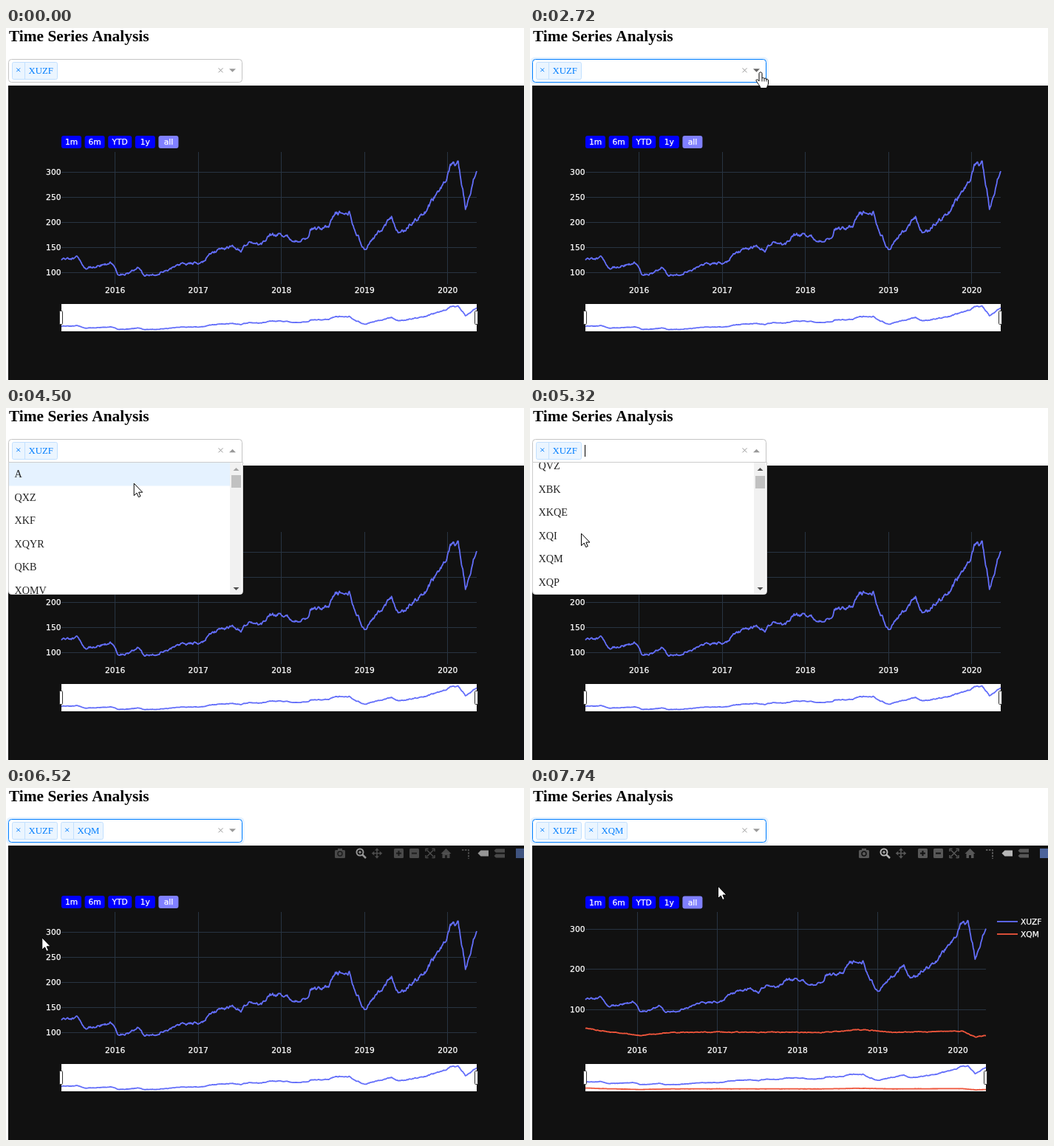
Animation of 701 by 477 pixels, one loop 8 s. Source, as an HTML page with a canvas:

```html
<!DOCTYPE html>
<html lang="en">
<head>
<meta charset="utf-8">
<title>Time Series Analysis</title>
<style>
html, body { margin: 0; width: 100%; height: 100%; overflow: hidden; background: #fff; }
canvas { display: block; width: 701px; height: 477px; }
</style>
</head>
<body>
<canvas id="stage" width="701" height="477"></canvas>
<script>
const ctx = document.getElementById('stage').getContext('2d');
const LOOP = 8000;
const SERIF = '"Liberation Serif", serif';
const SANS = '10.7px "DejaVu Sans", sans-serif';
const BLUE = '#636efa', RED = '#ef553b', ACCENT = '#007eff';
const OPTIONS = ['A', 'QXZ', 'XKF', 'XQYR', 'QKB', 'XQMV', 'QVZ', 'XBK', 'XKQE', 'XQI', 'XQM', 'XQP'];
const FIRST = 'XUZF', SECOND = 'XQM';
const ROW = 31.5, BLINK = 547;

// Moments of the interaction, in ms
const ENTER = 730, HOVER = 1360, FOCUS = 1760, OPEN = 2870, LEAVE = 4200;
const WHEEL = 5000, WHEEL_END = 5400, PICK = 6520, UPDATE = 7490;

// time, x, y of the pointer's turning points
const PATH = [
  [ENTER, 560, 300], [HOVER, 309, 62], [1610, 300, 58], [2320, 300, 58], [2720, 312, 60],
  [LEAVE, 312, 60], [4500, 173.5, 102], [4740, 104, 147], [5320, 69.5, 170], [5720, 54, 181],
  [6140, 48.5, 203], [PICK, 48.5, 203], [6950, 165, 106], [7100, 209, 74], [7610, 254.5, 133]
];

// position along the axis, price at the main turns
const HIGH = [
  [0, 125], [22, 130], [33, 109], [69, 118], [76, 96], [92, 97], [104, 110], [112, 94], [127, 95],
  [160, 116], [192, 120], [200, 136], [230, 152], [243, 145], [255, 159], [271, 154], [280, 174],
  [304, 176], [311, 163], [333, 167], [337, 185], [361, 191], [370, 220], [390, 221], [396, 188],
  [410, 146], [447, 208], [457, 176], [492, 220], [519, 282], [527, 315], [537, 324], [547, 228],
  [555, 272], [562, 308]
];
const LOW = [[0, 53], [35, 43], [75, 35], [120, 43], [330, 43], [370, 50], [420, 42], [510, 46], [528, 31], [542, 35]];

const ARROW = new Path2D('M0 0V16.5L3.8 13L6.2 18.5L8.8 17.4L6.4 12H11.5Z');
const HAND = new Path2D('M-2 1.5C-2-.6 2-.6 2 1.5V8.5C2 7 5 7 5 8.8C5.4 7.6 8 7.9 8 9.8C8.5 8.8 10.5 9.3 10.5 11V15C10.5 18 8.5 18.5 8.5 21.5H0C-.2 19-2.5 17-4 14.5C-5.5 12-6.8 11-5.5 10C-4.5 9.3-3 10.5-2 12Z');

const clamp = v => Math.max(0, Math.min(1, v));

// Linear walk through keys of the form [position, ...values]
function along(keys, pos) {
  const next = Math.max(1, keys.findIndex(k => k[0] > pos));
  const i = pos >= keys.at(-1)[0] ? keys.length - 1 : next;
  const [a, b] = [keys[i - 1], keys[i]];
  const u = clamp((pos - a[0]) / (b[0] - a[0]));
  return a.slice(1).map((v, n) => v + (b[n + 1] - v) * u);
}

// Turns key prices into [fraction, price] pairs with a seeded daily walk
function makeSeries(keys, seed) {
  const width = keys.at(-1)[0], days = 1258, points = [];
  let drift = 0;
  for (let i = 0; i <= days; i += 2) {
    seed = (seed * 16807) % 2147483647;
    drift = drift * 0.7 + (seed / 2147483647 - 0.5) * 0.033;
    const u = i / days;
    points.push([u, along(keys, u * width)[0] * (1 + drift)]);
  }
  return points;
}
const highSeries = makeSeries(HIGH, 421733);
const lowSeries = makeSeries(LOW, 977121);

// base is the stage height of price 100
const WIDE = { width: 562, base: 331, unit: 0.68, step: 50, shift: 0 };
const NARROW = { width: 542, base: 300, unit: 0.5425, step: 100, shift: 0.5 };

function text(str, x, y, font, color, align = 'left') {
  ctx.font = font;
  ctx.fillStyle = color;
  ctx.textAlign = align;
  ctx.fillText(str, x, y);
}

// Chart text, slightly emboldened
function label(str, x, y, align) {
  text(str, x, y, SANS, '#fff', align);
  ctx.lineWidth = 0.25;
  ctx.strokeStyle = '#fff';
  ctx.strokeText(str, x, y);
}

function rect(x, y, w, h, color) {
  ctx.fillStyle = color;
  ctx.fillRect(x, y, w, h);
}

function box(x, y, w, h, r, fill, stroke) {
  ctx.beginPath();
  ctx.roundRect(x, y, w, h, r);
  if (fill) { ctx.fillStyle = fill; ctx.fill(); }
  if (stroke) { ctx.lineWidth = 1; ctx.strokeStyle = stroke; ctx.stroke(); }
}

function poly(points, color) {
  ctx.beginPath();
  points.forEach(([x, y]) => ctx.lineTo(x, y));
  ctx.fillStyle = color;
  ctx.fill();
}

function line(points, color, width) {
  ctx.beginPath();
  points.forEach(([x, y]) => ctx.lineTo(x, y));
  ctx.strokeStyle = color;
  ctx.lineWidth = width;
  ctx.lineJoin = 'round';
  ctx.stroke();
}

function ring(x, y, r, color, width) {
  ctx.beginPath();
  ctx.arc(x, y, r, 0, 7);
  ctx.lineWidth = width;
  ctx.strokeStyle = color;
  ctx.stroke();
}

function triangle(x, y, dir, color, half = 4.5, height = 4.5) {
  poly([[x - half, y - dir * height / 2], [x + half, y - dir * height / 2], [x, y + dir * height / 2]], color);
}

function cross(x, y, r, color) {
  line([[x - r, y - r], [x + r, y + r]], color, 1);
  line([[x - r, y + r], [x + r, y - r]], color, 1);
}

function drawButtons(y) {
  let x = 75;
  ['1m', '6m', 'YTD', '1y', 'all'].forEach(name => {
    const w = name === 'YTD' ? 32 : 27;
    box(x, y, w, 17, 3, name === 'all' ? '#8080ff' : '#00f');
    label(name, x + w / 2, y + 12, 'center');
    x += w + 4.6;
  });
}

function drawChart(view, series) {
  const yOf = price => view.base - (price - 100) * view.unit;
  rect(3, 78, 698, 399, '#111');
  drawButtons(146 + view.shift);

  for (let year = 0; year < 5; year++) {
    const x = 75 + view.width * (235.8 + 365.25 * year) / 1824;
    rect(Math.floor(x), 168, 1, 179, '#283442');
    label(2016 + year, x, 359, 'center');
  }
  for (let price = 100; price <= 300; price += view.step) {
    const y = Math.floor(yOf(price));
    rect(75, y, view.width, 1, '#283442');
    label(price, 74.5, y + 4, 'right');
  }

  rect(75, 374, view.width, 37, '#fff');
  series.forEach(([points, color]) => {
    const main = points.map(([u, price]) => [75 + u * view.width, yOf(price)]);
    line(main, color, 1.8);
    line(main.map(([x, y]) => [x, 374 + (y - 168) * 37 / 179]), color, 1.8);
  });
  [75, 75 + view.width].forEach(x => box(x - 2.5, 383.5, 4, 18, 1, '#fff', '#333'));
}

function drawLegend() {
  [[FIRST, BLUE, 181], [SECOND, RED, 198]].forEach(([name, color, y]) => {
    line([[632, y], [660, y]], color, 1.8);
    label(name, 664, y + 4, 'left');
  });
}

function drawModebar(alpha) {
  const dim = '#585858', lit = '#b7b7b7', back = '#111';
  ctx.save();
  ctx.globalAlpha = alpha;

  // camera
  box(445, 84, 14, 11, 1.5, dim);
  rect(449, 82, 6, 3, dim);
  ring(452, 89, 3, back, 1.5);

  // magnifier
  ring(479, 87, 4.5, lit, 2);
  line([[482.5, 90.5], [487, 95]], lit, 2.5);
  line([[477, 87], [481, 87]], lit, 1.2);
  line([[479, 85], [479, 89]], lit, 1.2);

  // pan
  for (let i = 0; i < 4; i++) {
    ctx.save();
    ctx.translate(502, 88.5);
    ctx.rotate(i * Math.PI / 2);
    line([[0, 0], [0, 5]], dim, 1.6);
    triangle(0, 5.5, 1, dim, 3, 3.5);
    ctx.restore();
  }

  // zoom in and out
  [525, 546].forEach((x, i) => {
    box(x, 82, 13, 13, 1.5, dim);
    rect(x + 3, 87.5, 7, 2, back);
    if (!i) rect(x + 5.5, 85, 2, 7, back);
  });

  // autoscale
  for (const sx of [-1, 1]) for (const sy of [-1, 1]) {
    const at = (dx, dy) => [574 + sx * dx, 88.5 + sy * dy];
    line([at(2.5, 6), at(6, 6), at(6, 2.5)], dim, 1.5);
    line([at(0, 0), at(4.5, 4.5)], dim, 1.5);
  }

  // home
  triangle(595.5, 85.5, -1, dim, 7, 7);
  rect(590.5, 88, 10, 7, dim);
  rect(594, 91, 3, 4, back);

  // spike lines
  ctx.setLineDash([2.5, 1.5]);
  line([[617, 84], [626, 84], [626, 96]], dim, 2);
  ctx.setLineDash([]);

  // hover labels
  const tag = (x, y, w, h, color) =>
    poly([[x, y + h / 2], [x + h / 2, y], [x + w, y], [x + w, y + h], [x + h / 2, y + h]], color);
  tag(638.5, 84.5, 14.5, 8, lit);
  tag(660.5, 82.5, 14.5, 5, dim);
  tag(660.5, 89.5, 14.5, 5, dim);

  rect(690, 82, 11, 13, '#4c649b');
  ctx.restore();
}

function drawChip(name, x, width) {
  box(x + 0.5, 46.5, width, 23, 2, '#ebf5ff', '#c2e0ff');
  rect(x + 17, 47, 1, 22, '#c2e0ff');
  cross(x + 8.7, 56.8, 2.4, ACCENT);
  text(name, x + 22.5, 62, '12.8px ' + SERIF, ACCENT);
}

function drawSelect(t, open) {
  const focused = t >= FOCUS && !open;
  if (focused) box(0.5, 39.5, 322, 37, 6, '#e5f2ff');
  box(3.5, 42.5, 316, 31, open ? [4, 4, 0, 0] : 4, '#fff', focused ? ACCENT : '#c4c4c4');
  drawChip(FIRST, 8, 61);
  if (t >= PICK) drawChip(SECOND, 74, 57);

  const caretOn = t >= FOCUS && t < PICK && Math.floor((t - FOCUS) / BLINK) % 2 === 0;
  if (caretOn) rect(74, 50, 1, 16, '#000');

  cross(290.5, 57.3, 3, '#999');
  const hovered = t >= HOVER && t < LEAVE;
  triangle(306.5, open ? 58 : 57.5, open ? -1 : 1, hovered ? '#666' : '#999');
}

const scrollAt = t => 200 * clamp((t - WHEEL) / 170);

// The row last touched by a pointer move; the wheel alone does not change it
function activeRow(t) {
  const moved = t >= WHEEL && t < WHEEL_END ? WHEEL : t;
  const y = along(PATH, moved)[1];
  return Math.max(0, Math.floor((y - 74 + scrollAt(moved)) / ROW));
}

function drawMenu(t) {
  const scroll = scrollAt(t), active = activeRow(t);
  box(3.5, 73.5, 317, 179, [0, 0, 4, 4], '#fff', '#ccc');
  ctx.save();
  ctx.beginPath();
  ctx.rect(4, 74, 316, 178);
  ctx.clip();
  OPTIONS.forEach((name, i) => {
    const y = 74 + i * ROW - scroll;
    if (i === active) rect(4, y, 299, ROW, '#e5f2ff');
    text(name, 11.5, y + 20.3, '14.2px ' + SERIF, '#222');
  });
  rect(303, 74, 16, 178, '#f1f1f1');
  rect(305, 91 + scroll / 200, 13, 17, '#c1c1c1');
  triangle(311.5, 83, -1, scroll ? '#505050' : '#a3a3a3', 4, 4);
  triangle(311.5, 245, 1, '#505050', 4, 4);
  ctx.restore();
}

function drawPointer(t) {
  if (t < ENTER) return;
  const [x, y] = along(PATH, t);
  const hand = t >= HOVER && t < LEAVE + 150;
  const shape = hand ? HAND : ARROW;
  ctx.save();
  ctx.translate(x, y);
  ctx.fillStyle = '#fff';
  ctx.strokeStyle = '#000';
  ctx.lineWidth = 1;
  ctx.fill(shape);
  ctx.stroke(shape);
  if (hand) [2, 5, 8].forEach(fx => line([[fx, 9], [fx, 12.5]], '#000', 0.9));
  ctx.restore();
}

function draw(now) {
  const t = now % LOOP;
  const open = t >= OPEN && t < PICK;
  rect(0, 0, 701, 477, '#fff');
  text('Time Series Analysis', 4, 18, 'bold 21.36px ' + SERIF, '#000');
  if (t < UPDATE) {
    drawChart(WIDE, [[highSeries, BLUE]]);
  } else {
    drawChart(NARROW, [[highSeries, BLUE], [lowSeries, RED]]);
    drawLegend();
  }
  if (t >= ENTER && t < HOVER) drawModebar(clamp(0.6 + (t - ENTER) / 300) * clamp((HOVER - t) / 200));
  if (t >= PICK) drawModebar(clamp(0.8 + (t - PICK) / 750));
  drawSelect(t, open);
  if (open) drawMenu(t);
  drawPointer(t);
}

const start = performance.now();
function tick() {
  draw(performance.now() - start);
  requestAnimationFrame(tick);
}
tick();
</script>
</body>
</html>
```
